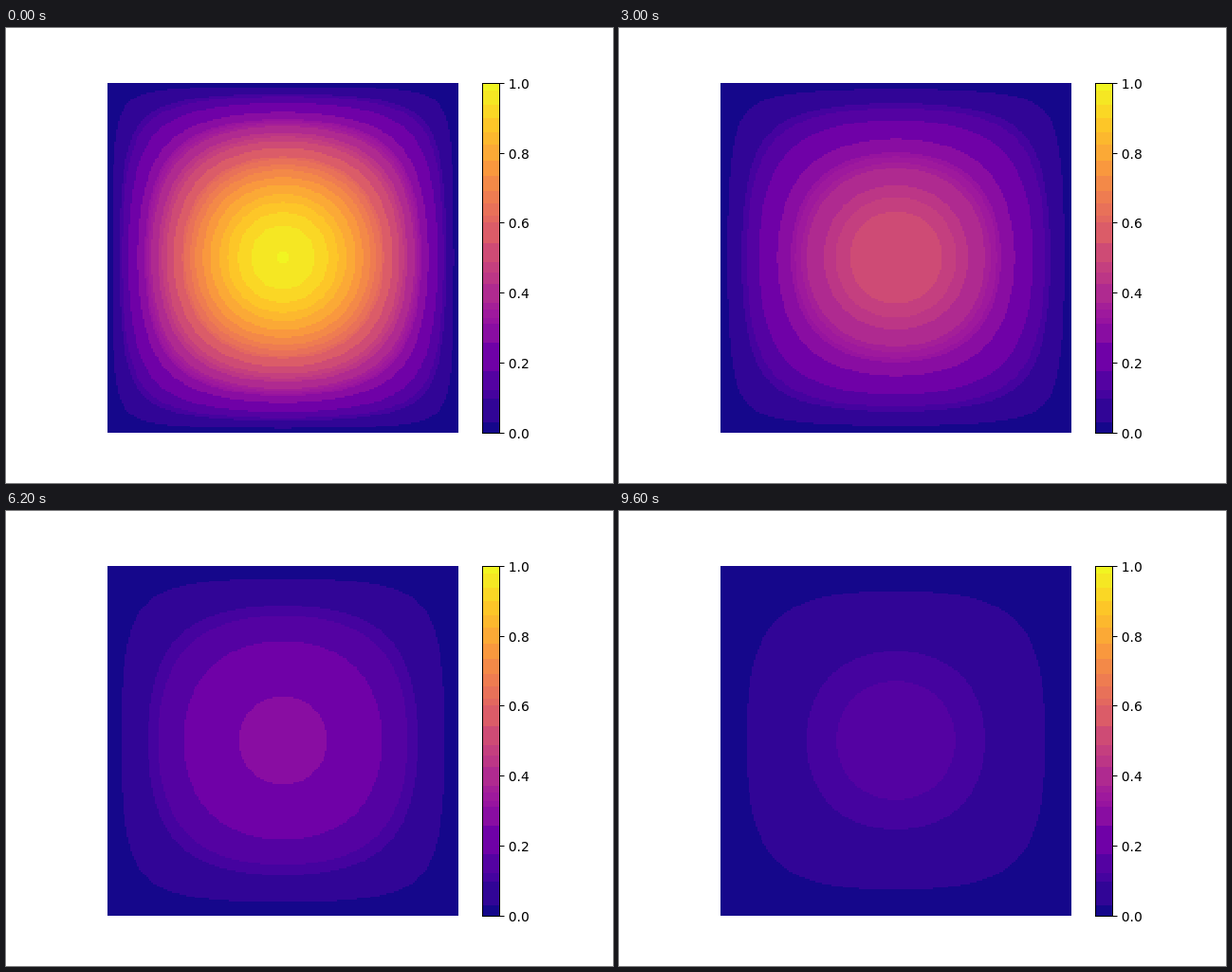
An HTML page with a canvas for the animation above (9.7 s loop, 640x480 px).

```html
<!DOCTYPE html>
<html lang="en">
<head>
<meta charset="utf-8">
<title>Heat diffusion on a square plate</title>
<style>
  html, body { margin: 0; width: 640px; height: 480px; overflow: hidden; background: #fff; }
  canvas, svg { position: absolute; left: 0; top: 0; }
  text { font: 13.89px "DejaVu Sans", sans-serif; }
</style>
</head>
<body>
<canvas id="plate" width="640" height="480"></canvas>
<svg id="bar" width="640" height="480"></svg>
<script>
const FRAME_MS = 100, FRAMES = 97;
const CELLS = 200, SIZE = 370, LEFT = 107, TOP = 57;
const START = 0.978, DECAY = 0.0202;

// Plasma colour map: position (0..255) and colour
const STOPS = [
  [0, 0x0d0887], [14, 0x2e0595], [28, 0x46039f], [57, 0x7201a8],
  [85, 0x9c179e], [113, 0xbd3786], [142, 0xd8576b], [170, 0xed7953],
  [198, 0xfb9f3a], [227, 0xfdca26], [255, 0xf0f921]
];
// Lower edges of the colour bands, in 1/256
const EDGES = [0, 8, 25, 31, 45, 66, 80, 84, 90, 95, 109, 117, 125, 139,
  154, 159, 168, 177, 188, 199, 211, 220, 230, 240, 250, 256];

function plasma(v) {
  const i = Math.max(1, STOPS.findIndex(s => s[0] >= v));
  const [p, a] = STOPS[i - 1], [q, b] = STOPS[i];
  const k = (v - p) / (q - p);
  return [16, 8, 0].map(s => {
    const from = a >> s & 255, to = b >> s & 255;
    return Math.round(from + (to - from) * k);
  });
}

const bands = EDGES.slice(0, -1).map((e, i) => plasma((e + EDGES[i + 1] - 1) / 2));
const shade = new Uint32Array(256);   // packed ABGR per level
bands.forEach(([r, g, b], i) =>
  shade.fill((255 << 24 | b << 16 | g << 8 | r) >>> 0, EDGES[i], EDGES[i + 1]));

// Colour bar with ticks
const barY = level => 427.2 - 369.6 * level;
let svg = "";
bands.forEach((c, i) => {
  const y = Math.round(barY(EDGES[i + 1] / 256));
  const bottom = Math.round(barY(EDGES[i] / 256));
  svg += `<rect x="502" y="${y}" width="18" height="${bottom - y}" fill="rgb(${c})"/>`;
});
svg += '<rect x="502.5" y="58.5" width="18" height="369" fill="none" stroke="#000"/>';
for (let i = 0; i <= 5; i++) {
  const y = Math.round(barY(i / 5)) + 0.5;
  svg += `<path d="M520.5 ${y}h5" stroke="#000"/>` +
    `<text x="529.8" y="${y + 5}">${(i / 5).toFixed(1)}</text>`;
}
document.getElementById("bar").innerHTML = svg;

// Plate: the lowest sine mode on a grid, cooling exponentially
const ctx = document.getElementById("plate").getContext("2d");
const image = ctx.createImageData(SIZE, SIZE);
const pixels = new Uint32Array(image.data.buffer);
const wave = Array.from({ length: SIZE }, (_, p) => {
  const cell = Math.floor((p + 0.5) * CELLS / SIZE);
  return Math.sin(Math.PI * cell / (CELLS - 0.97));
});

function drawPlate(step) {
  const heat = 256 * START * Math.exp(-DECAY * step);
  for (let y = 0, n = 0; y < SIZE; y++) {
    const row = heat * wave[y];
    for (let x = 0; x < SIZE; x++) pixels[n++] = shade[row * wave[x] | 0];
  }
  ctx.putImageData(image, LEFT, TOP, 0, 1, SIZE, SIZE - 1);
}

let shown = -1;
function tick() {
  const step = Math.floor(performance.now() / FRAME_MS) % FRAMES;
  if (step !== shown) drawPlate(shown = step);
  requestAnimationFrame(tick);
}
tick();
</script>
</body>
</html>
```
